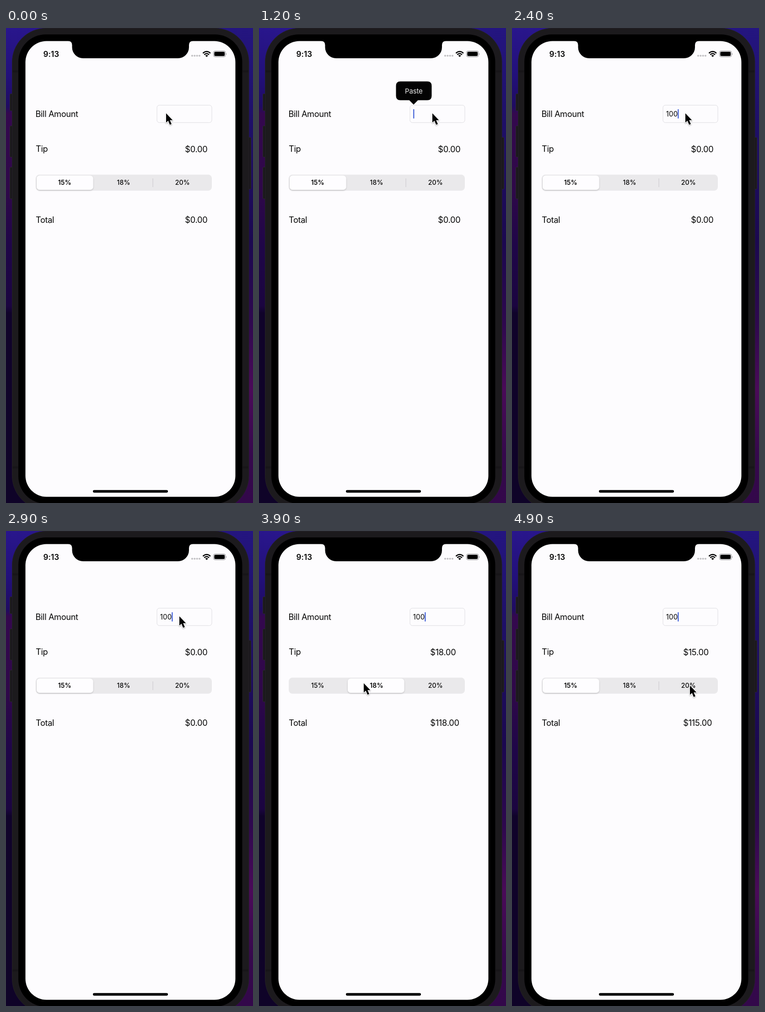
These frames come from a looping animation (540x1036 px, 5 s). An HTML page:

```html
<!DOCTYPE html>
<html lang="en">
<head>
<meta charset="utf-8">
<title>Tip calculator</title>
<style>
  html, body { margin: 0; width: 100%; height: 100%; overflow: hidden; background: #1c0a4a; }
  svg { display: block; width: 100%; height: 100%; }
  text { font-family: Inter, Roboto, "Liberation Sans", sans-serif; fill: #050505; }
  .label { font-size: 18.2px; letter-spacing: -.36px; }
  .amount { letter-spacing: -.2px; }
  .seg { font-size: 14.1px; font-weight: 500; letter-spacing: .1px; text-anchor: middle; }
  .on { font-weight: 600; }
  .button { fill: #1a181c; stroke: #2c282f; stroke-width: 1; }
</style>
</head>
<body>
<svg viewBox="0 0 540 1036">
  <defs>
    <linearGradient id="left" x2="0" y2="1">
      <stop offset="0" stop-color="#29168c"/>
      <stop offset=".1" stop-color="#22107a"/>
      <stop offset=".165" stop-color="#1f0b62"/>
      <stop offset=".18" stop-color="#34084e"/>
      <stop offset=".34" stop-color="#2f0849"/>
      <stop offset=".46" stop-color="#1f0648"/>
      <stop offset=".585" stop-color="#1b0540"/>
      <stop offset=".6" stop-color="#10032a"/>
      <stop offset="1" stop-color="#0f0328"/>
    </linearGradient>
    <linearGradient id="right" x2="0" y2="1">
      <stop offset="0" stop-color="#241580"/>
      <stop offset=".2" stop-color="#1e0f68"/>
      <stop offset=".45" stop-color="#1b0850"/>
      <stop offset=".62" stop-color="#2e084e"/>
      <stop offset=".76" stop-color="#4a0a58"/>
      <stop offset=".9" stop-color="#35084c"/>
      <stop offset="1" stop-color="#33084a"/>
    </linearGradient>
    <filter id="soft" x="-20%" y="-30%" width="140%" height="170%">
      <feDropShadow dx="0" dy="1.5" stdDeviation="1.8" flood-opacity=".2"/>
    </filter>
    <filter id="drop" x="-40%" y="-30%" width="190%" height="170%">
      <feDropShadow dx="0" dy="1.2" stdDeviation="1.2" flood-opacity=".35"/>
    </filter>
  </defs>

  <rect width="270" height="1036" fill="url(#left)"/>
  <rect x="270" width="270" height="1036" fill="url(#right)"/>

  <!-- phone -->
  <g class="button">
    <rect x="8.5" y="143.5" width="8" height="37" rx="2"/>
    <rect x="8.5" y="213.5" width="8" height="68" rx="2"/>
    <rect x="8.5" y="303.5" width="8" height="69" rx="2"/>
    <rect x="527" y="238.5" width="8.5" height="113" rx="2"/>
  </g>
  <rect x="13.5" y=".5" width="517.5" height="1050" rx="74" fill="#1c1a1d" stroke="#242126"/>
  <path d="M14 92h13v5h-13z M517 92h13v5h-13z M14 956h13v5h-13z M517 956h13v5h-13z" fill="#181619"/>
  <rect x="27" y="14" width="489.5" height="1023.5" rx="60" fill="#000"/>
  <rect x="42.5" y="28.5" width="459" height="994" rx="46" fill="#fdfcfe"/>
  <path d="M136 28Q144.500 29 144.500 37V42A24 24 0 0 0 168.500 66H376A24 24 0 0 0 400 42V37Q400 29 408.500 28Z" fill="#000"/>
  <rect x="190" y="1007.800" width="164" height="5.600" rx="2.8"/>

  <!-- status bar -->
  <text x="81.500" y="62.800" font-size="17" font-weight="600" letter-spacing=".1">9:13</text>
  <g fill="#c2c1c4">
    <circle cx="407" cy="60.500" r="2.1"/><circle cx="412.400" cy="60.500" r="2.1"/>
    <circle cx="417.700" cy="60.500" r="2.1"/><circle cx="423" cy="60.500" r="2.1"/>
  </g>
  <g fill="none" stroke="#000" stroke-width="2.5">
    <path d="M430.500 55Q438.700 47.600 446.900 55"/>
    <path d="M433.400 58.200Q438.700 53.400 444 58.200"/>
  </g>
  <path d="M435.600 60.200Q438.700 57.800 441.800 60.200L438.700 63.300Z"/>
  <rect x="453.500" y="50" width="26.500" height="13" rx="3.800" fill="none" stroke="#8f8e91"/>
  <rect x="455.300" y="51.800" width="22.900" height="9.400" rx="2.2"/>
  <path d="M481.200 54.500q1.800 2 0 4.200z" fill="#8f8e91"/>

  <!-- form -->
  <g class="label">
    <text x="64.500" y="193.700">Bill Amount</text>
    <text x="65" y="269.800">Tip</text>
    <text x="65" y="424.800">Total</text>
    <text id="tip" class="amount" y="270.800"></text>
    <text id="total" class="amount" y="424.800"></text>
  </g>
  <rect x="330" y="168.300" width="120" height="38" rx="5.500" fill="#fdfcfe" stroke="#dddce0"/>
  <text id="bill" x="336.700" y="192.800" font-size="15.200" letter-spacing=".15"></text>
  <rect id="caret" y="177" width="2.200" height="20.500" rx="1" fill="#3f5fd8"/>

  <rect x="65" y="319.800" width="385" height="35" rx="8" fill="#eae9eb"/>
  <rect id="divider" x="320.500" y="328" width="1.100" height="19" fill="#cbc9cd"/>
  <rect id="pill" y="321.700" width="123.500" height="31.300" rx="6.800" fill="#fefdff" filter="url(#soft)"/>
  <text class="seg" x="128.300" y="342.400">15%</text>
  <text class="seg" x="257" y="342.400">18%</text>
  <text class="seg" x="385.800" y="342.400">20%</text>

  <g id="paste">
    <path d="M309 116.500H368Q377.500 116.500 377.500 126V148Q377.500 157.500 368 157.500H347.500L338 167L328.500 157.500H309Q299.500 157.500 299.500 148V126Q299.500 116.500 309 116.500Z" fill="#030303"/>
    <text x="338.300" y="142.600" font-size="15.100" letter-spacing="-.2" text-anchor="middle" style="fill:#ebebeb">Paste</text>
  </g>

  <g id="cursor" filter="url(#drop)">
    <path d="M0 0V20.300L4.500 16.300L8.200 25L12 23.400L8.300 14.900H14.300Z"
      fill="#000" stroke="#fff" stroke-width="2.400" stroke-linejoin="round" paint-order="stroke"/>
  </g>
</svg>
<script>
  const LOOP = 5000, TICK = 100;
  const el = id => document.getElementById(id);
  const segs = document.querySelectorAll('.seg');

  // [ms, x, y]
  const path = [
    [0, 350, 186], [400, 350, 186], [500, 373, 186], [600, 379, 186],
    [2900, 379, 186], [3100, 315, 250], [3300, 238, 324], [3400, 229, 332],
    [4000, 229, 332], [4200, 163, 336], [4300, 122, 338], [4400, 117, 338],
    [4600, 117, 338], [4700, 178, 338], [4800, 325, 337], [4900, 389, 337]
  ];
  // [ms, share of the way from first to second segment]
  const slide = [[0, 0], [3500, 0], [3600, .63], [3700, 1], [4400, 1], [4500, .365], [4600, 0]];
  const fade = [[0, 0], [900, 0], [1000, 1], [2100, 1], [2200, 0]];
  // [ms, value]
  const typed = [[0, ''], [2200, '1'], [2300, '10'], [2400, '100']];
  const rates = [[0, 0], [3500, 18], [4400, 15]];

  const hold = (table, t) => table.filter(row => row[0] <= t).pop()[1];

  function tween(table, t, col = 1) {
    const i = table.findIndex(row => row[0] > t);
    if (i < 0) return table[table.length - 1][col];
    const a = table[i - 1], b = table[i];
    return a[col] + (b[col] - a[col]) * (t - a[0]) / (b[0] - a[0]);
  }

  function amount(id, value) {
    el(id).textContent = '$' + value.toFixed(2);
    el(id).setAttribute('x', value ? 374.2 : 391.2);
  }

  function draw(t) {
    el('cursor').setAttribute('transform', `translate(${tween(path, t)} ${tween(path, t, 2)})`);

    const bill = hold(typed, t);
    el('bill').textContent = bill;
    el('caret').setAttribute('visibility', t >= 600 ? 'visible' : 'hidden');
    el('caret').setAttribute('x', [337.2, 344, 353, 362.3][bill.length]);
    el('paste').setAttribute('opacity', tween(fade, t));

    const rate = hold(rates, t);
    amount('tip', rate);
    amount('total', rate ? 100 + rate : 0);

    const p = tween(slide, t);
    el('pill').setAttribute('x', 67 + 127 * p);
    el('divider').setAttribute('opacity', (1 - p) ** 2.5);
    segs.forEach((s, i) => s.classList.toggle('on', i === (rate === 18 ? 1 : 0)));
  }

  const start = performance.now();
  function frame() {
    const t = (performance.now() - start) % LOOP;
    draw(Math.floor(t / TICK) * TICK);
    requestAnimationFrame(frame);
  }
  frame();
</script>
</body>
</html>
```
